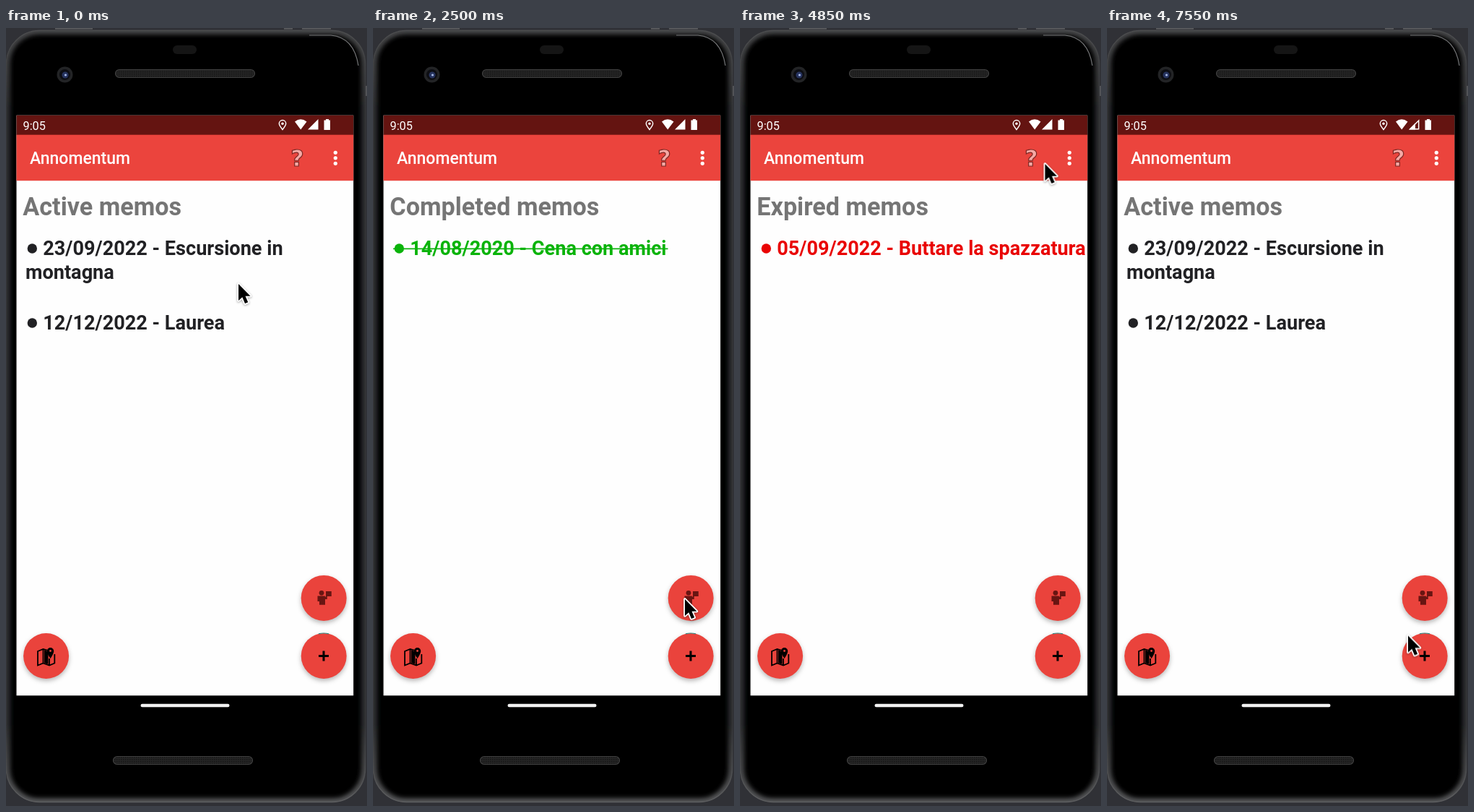
Animation, 500 px wide and 1076 px high, one loop 7600 ms. Source, as an HTML page:

```html
<!DOCTYPE html>
<html lang="en">
<head>
<meta charset="utf-8">
<title>Memo app</title>
<style>
html, body { margin: 0; width: 100%; height: 100%; overflow: hidden; background: #2c2d31; }
svg { display: block; width: 100%; height: 100%; font-family: Roboto, sans-serif; }
.head { font-weight: 700; font-size: 34.15px; fill: #757575; }
.memo { font-weight: 700; font-size: 27.1px; }
.fab { fill: #ea433c; filter: drop-shadow(0 3.5px 3px rgba(0, 0, 0, .28)); }

/* one loop is 7600 ms, so 1% is 76 ms */
.list, .signal { animation: 7600ms step-end infinite; }
#active { animation-name: active; }
#done { animation-name: done; }
#expired { animation-name: expired; }
#full { animation-name: full; }
#weak { animation-name: weak; }
#menu { animation: menu 7600ms linear infinite; transform-origin: 477px 153px; }
#press { animation: press 7600ms linear infinite; }
#cursor { animation: move 7600ms ease-in-out infinite; }

@keyframes active {
  0%, 37.5%, 86.84% { opacity: 1; }
  16.45%, 63.82% { opacity: 0; }
  100% { opacity: 1; }
}
@keyframes done {
  0%, 37.5%, 100% { opacity: 0; }
  16.45% { opacity: 1; }
}
@keyframes expired {
  0%, 86.84%, 100% { opacity: 0; }
  63.82% { opacity: 1; }
}
@keyframes full {
  0% { opacity: 1; }
  72.37%, 100% { opacity: 0; }
}
@keyframes weak {
  0% { opacity: 0; }
  72.37%, 100% { opacity: 1; }
}
@keyframes menu {
  0%, 53.9% { opacity: 0; transform: scale(.85); }
  56.6%, 62.5% { opacity: 1; transform: none; }
  63.8%, 100% { opacity: 0; transform: none; }
}
@keyframes press {
  0%, 15.13% { opacity: 0; }
  16.45%, 19.1% { opacity: 1; }
  24.8%, 36.18% { opacity: 0; }
  36.9%, 38.8% { opacity: 1; }
  43.4%, 100% { opacity: 0; }
}
@keyframes move {
  0%, .6% { transform: translate(322px, 354px); }
  12.5%, 32.2% { transform: translate(433px, 789px); }
  32.9% { transform: translate(432px, 790px); }
  34.2%, 38.8% { transform: translate(431px, 790px); animation-timing-function: ease-in; }
  45.4% { transform: translate(457px, 212px); animation-timing-function: ease-out; }
  48%, 54.6% { transform: translate(459.5px, 182.5px); }
  59.2%, 63.8% { transform: translate(422.5px, 188px); }
  70.4%, 75.6% { transform: translate(403px, 385px); }
  79.6%, 81.6% { transform: translate(478px, 440px); }
  85.5%, 87.5% { transform: translate(400px, 461px); animation-timing-function: ease-in; }
  96% { transform: translate(418px, 799px); animation-timing-function: ease-out; }
  97.4%, 100% { transform: translate(417px, 840.5px); }
}
</style>
</head>
<body>
<svg viewBox="0 0 500 1076" preserveAspectRatio="none">
  <defs>
    <linearGradient id="rim" x2="0" y2="1">
      <stop offset="0" stop-color="#4c4d4f"/>
      <stop offset=".1" stop-color="#333436"/>
      <stop offset=".9" stop-color="#333436"/>
      <stop offset="1" stop-color="#5d5e60"/>
    </linearGradient>
    <filter id="soft"><feGaussianBlur stdDeviation="3"/></filter>
    <clipPath id="body"><rect x="0" y="3" width="498" height="1068" rx="46"/></clipPath>
    <clipPath id="screen"><rect x="14.500" y="120.700" width="466.700" height="802.500"/></clipPath>
    <pattern id="mesh" width="3" height="3" patternUnits="userSpaceOnUse">
      <rect width="3" height="3" fill="#242424"/>
      <rect width="1.500" height="1.500" fill="#151515"/>
    </pattern>
  </defs>

  <!-- phone body -->
  <rect width="500" height="1076" fill="#303136"/>
  <path d="M68 1H120M385 1H397M410 1H450" stroke="#56575a" stroke-width="2"/>
  <rect x="495" y="80" width="5" height="14" fill="#55565a"/>
  <g clip-path="url(#body)">
    <rect width="500" height="1076"/>
    <rect x="1" y="4" width="496" height="1066" rx="45" fill="none" stroke="url(#rim)" stroke-width="9" filter="url(#soft)"/>
  </g>
  <rect x=".5" y="3.500" width="497" height="1067" rx="46" fill="none" stroke="url(#rim)" stroke-width="1.500"/>
  <path d="M420 10H450Q482 13 488 52" fill="none" stroke="#77787a" stroke-width="1.200"/>
  <rect x="231" y="24" width="33" height="12" rx="6" fill="#151515"/>
  <circle cx="81.500" cy="64.500" r="11" fill="#232426"/>
  <circle cx="81.500" cy="64.500" r="7.500" fill="#0d0e13"/>
  <circle cx="82" cy="65" r="4.500" fill="#26335f"/>
  <circle cx="82.500" cy="65" r="1.600" fill="#a9bbe8"/>
  <g fill="url(#mesh)" stroke="#404040" stroke-width="1.200">
    <rect x="151.500" y="57.500" width="193" height="11" rx="5.500"/>
    <rect x="148.500" y="1007.500" width="193" height="11" rx="5.500"/>
  </g>
  <rect x="186.500" y="934.700" width="123" height="4.600" rx="2.300" fill="#f2f2f2"/>

  <g clip-path="url(#screen)">
    <rect x="14" y="120" width="468" height="804" fill="#fefefe"/>
    <rect x="14" y="120" width="468" height="28" fill="#641411"/>
    <rect x="14" y="147.700" width="468" height="63.500" fill="#eb443d"/>

    <!-- status bar -->
    <g fill="#fff">
      <text x="23.500" y="140.500" font-size="16.300">9:05</text>
      <path d="M383 140.500Q378.300 134.500 378.300 132.200A4.700 4.700 0 0 1 387.700 132.200Q387.700 134.500 383 140.500Z" fill="none" stroke="#fff" stroke-width="1.400"/>
      <circle cx="383" cy="132.300" r="1.700"/>
      <path d="M400 129.500Q408 123 416.500 129.500L408.200 140.500Z"/>
      <path id="full" class="signal" d="M432.500 126V140.500H418Z"/>
      <g id="weak" class="signal">
        <path d="M431.700 128V139.700H420Z" fill="none" stroke="#fff" stroke-width="1.500"/>
        <path d="M427 131.500V140.500H418Z"/>
      </g>
      <path d="M443 126H447V127.500H449V141H440.500V127.500H443Z"/>
    </g>

    <!-- app bar -->
    <text x="33" y="188.300" font-size="23" font-weight="500" fill="#fff">Annomentum</text>
    <text x="403.500" y="191" text-anchor="middle" font-size="32" font-weight="700" font-family="'DejaVu Sans', sans-serif" fill="#f5a9a5" stroke="#7c2723" stroke-width="1.200">?</text>
    <g fill="#fff">
      <circle cx="456.300" cy="172.300" r="2.600"/>
      <circle cx="456.300" cy="179.800" r="2.600"/>
      <circle cx="456.300" cy="187.300" r="2.600"/>
    </g>

    <!-- memo lists -->
    <g id="active" class="list">
      <text class="head" x="23.300" y="259">Active memos</text>
      <g class="memo" fill="#212124">
        <circle cx="36.300" cy="305" r="6.700"/>
        <text x="51.200" y="313.500">23/09/2022 - Escursione in</text>
        <text x="27" y="346.500">montagna</text>
        <circle cx="36.300" cy="408" r="6.700"/>
        <text x="51.200" y="417">12/12/2022 - Laurea</text>
      </g>
    </g>
    <g id="done" class="list">
      <text class="head" x="23.300" y="259">Completed memos</text>
      <g class="memo" fill="#0ab30a">
        <circle cx="36.300" cy="305" r="6.700"/>
        <text x="51.200" y="313.500">14/08/2020 - Cena con amici</text>
        <rect x="28" y="304.500" width="380.500" height="1.700"/>
      </g>
    </g>
    <g id="expired" class="list">
      <text class="head" x="23.300" y="259">Expired memos</text>
      <g class="memo" fill="#e90404">
        <circle cx="36.300" cy="305" r="6.700"/>
        <text x="51.200" y="313.500">05/09/2022 - Buttare la spazzatura</text>
      </g>
    </g>

    <!-- round buttons -->
    <circle class="fab" cx="440.200" cy="788.400" r="31.500"/>
    <circle class="fab" cx="440.200" cy="868.500" r="31.500"/>
    <circle class="fab" cx="55.600" cy="868.500" r="31.500"/>
    <path d="M433 837.800Q440 836.200 447 837.800" fill="none" stroke="#2f8d86" stroke-width="1.200"/>
    <path d="M433 868.500H447M440 861.500V875.500" stroke="#000" stroke-width="3"/>
    <g fill="#681512">
      <circle cx="437" cy="781.300" r="3.400"/>
      <path d="M431.500 785.500H441.500L443 787V779H450.800V786H444.800V790H442V797.800H434V793H431.500Z"/>
    </g>
    <g fill="none" stroke="#000" stroke-width="1.800">
      <path d="M57 860.500L51.500 859L44 862V881.500L51.500 878.500L60 881.500L67.300 878.500V866M51.500 859V878.500M60 872V881.500"/>
      <path d="M53 860L58.500 862.500V880L53 878Z" fill="#000" stroke="none"/>
      <path d="M61.500 872Q56.800 865 56.800 861.700A4.700 4.700 0 0 1 66.200 861.700Q66.200 865 61.500 872Z" fill="#000" stroke="none"/>
      <circle cx="61.500" cy="861.500" r="1.400" fill="#ea433c" stroke="none"/>
    </g>
    <circle id="press" cx="440.200" cy="788.400" r="31.500" fill="#a93330" fill-opacity=".86"/>

    <g id="menu">
      <rect x="254" y="153" width="223" height="72" rx="4" fill="#fff" style="filter: drop-shadow(0 2px 3px rgba(0, 0, 0, .3))"/>
      <text x="272" y="195.700" font-size="18.350" fill="#222">Expired memos</text>
    </g>
  </g>

  <g id="cursor">
    <path d="M0 0V23L5.300 18.300L9 27L13.200 25.300L9.500 16.700H16.500Z" stroke="#fff" stroke-width="3.600" stroke-linejoin="round" paint-order="stroke" style="filter: drop-shadow(0 1.500px 1.500px rgba(0, 0, 0, .35))"/>
  </g>
</svg>
</body>
</html>
```
